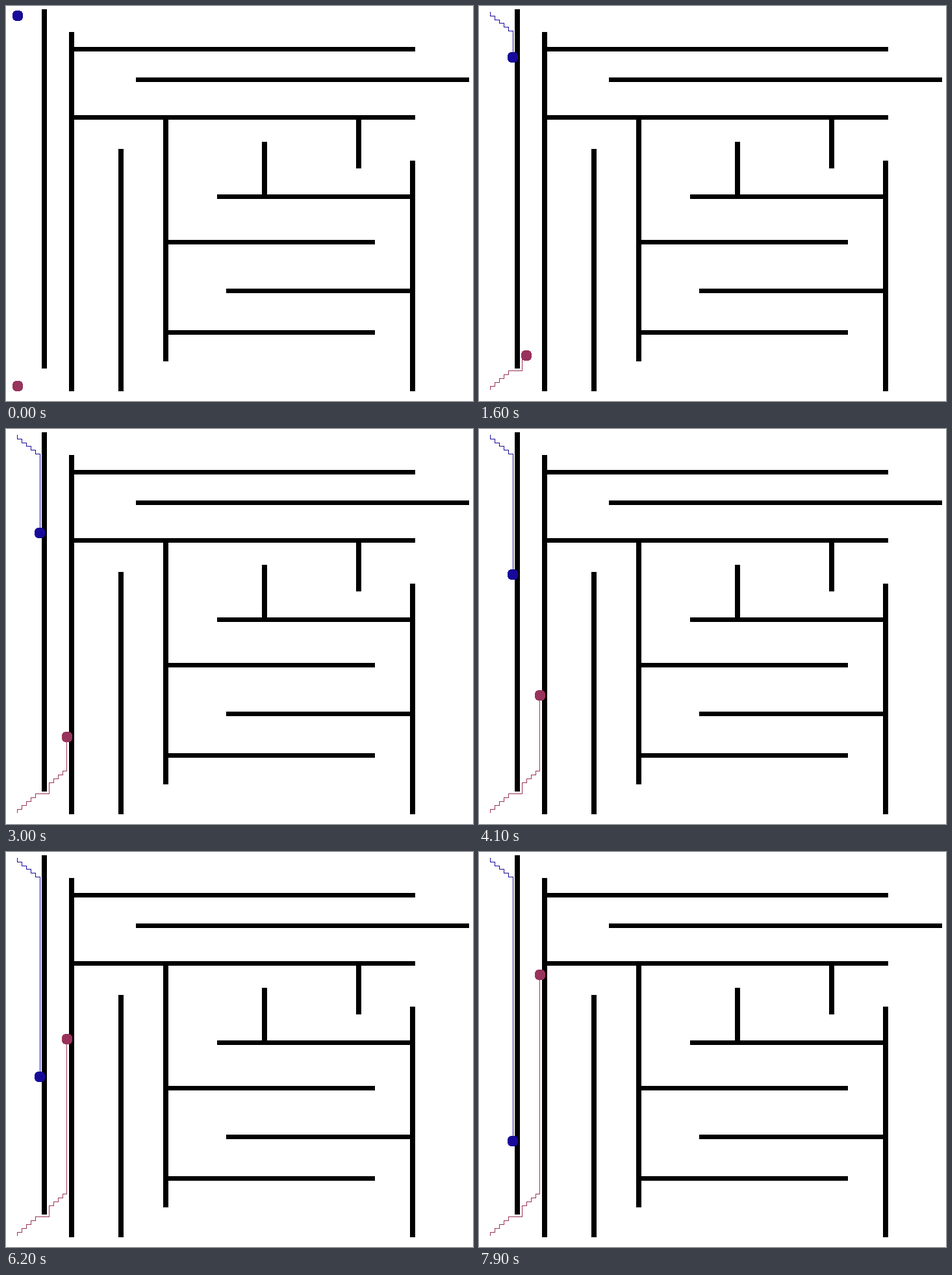
Recreate the animation shown at these times as a matplotlib script. Size 719 px wide and 608 px high, loop 8000 ms.

```python
import numpy as np
import matplotlib.pyplot as plt
from matplotlib.animation import FuncAnimation
from matplotlib.patches import Circle, Rectangle

W, H, DPI = 719, 608, 64
FRAMES, INTERVAL = 80, 100
LAST = 100                        # the maze is a grid of cells 0..LAST
CELL = np.array([6.91, 5.813])
ORIGIN = np.array([17.9, 9.06])
MOVES = {"R": (1, 0), "U": (0, -1), "D": (0, 1)}

fig = plt.figure(figsize=(W / DPI, H / DPI), dpi=DPI, facecolor="white")
ax = fig.add_axes([0, 0, 1, 1])
ax.set_xlim(0, W)
ax.set_ylim(H, 0)
ax.axis("off")


def place(cells):
    """Grid cells to stage pixels."""
    return ORIGIN + np.asarray(cells) * CELL


def wall(start, end):
    """Solid bar covering every cell from start to end."""
    x0, y0 = np.round(place(start)) - 4
    x1, y1 = np.round(place(end)) + (4, 3)
    ax.add_patch(Rectangle((x0, y0), x1 - x0, y1 - y0, fc="black", lw=0,
                           antialiased=False))


def across(row, left, right):
    wall((left, row), (right, row))


def down(col, top, bottom):
    wall((col, top), (col, bottom))


def build_maze():
    outer, inner, right = 12, 33, 88
    roof, shelf = 28, 49
    down(6, 0, LAST - 6)
    down(outer, 6, LAST)
    down(23, 37, LAST)
    down(inner, roof, LAST - 8)
    down(right, 40, LAST)
    down(55, 35, shelf)
    down(76, roof, 41)
    for row in (10, roof):
        across(row, outer, right)
    across(18, 27, LAST)
    for row, left in ((shelf, 45), (74, 47)):
        across(row, left, right)
    for row in (61, 85):
        across(row, inner, 79)


class Walker:
    def __init__(self, start, moves, color):
        steps = [start] + [MOVES[m] for m in moves]
        path = place(np.cumsum(steps, axis=0))
        self.dots = np.round(path)
        self.trail = np.column_stack([np.floor(path[:, 0]), self.dots[:, 1]])
        self.line, = ax.plot([], [], color=color, lw=72 / DPI, snap=True,
                             antialiased=False, solid_capstyle="butt",
                             solid_joinstyle="miter", zorder=3)
        self.dot = ax.add_patch(Circle((0, 0), 8, fc=color, lw=0, zorder=4,
                                       antialiased=False))

    def show(self, step):
        self.line.set_data(*self.trail[:step + 1].T)
        self.dot.center = tuple(self.dots[step])
        return self.line, self.dot


build_maze()

# Each walker climbs stairs to a wall, then follows it.
walkers = [
    Walker((0, 0), "DR" * 5 + "D" * FRAMES, "#170a9a"),
    Walker((0, LAST), "UR" * 4 + "U" + "RRR" + "UU" + "UR" * 4 + "U" * FRAMES,
           "#98335c"),
]


def update(i):
    # The first move is already made when the loop begins.
    return [artist for w in walkers for artist in w.show(i + 1)]


anim = FuncAnimation(fig, update, frames=FRAMES, interval=INTERVAL,
                     repeat=True, repeat_delay=0, blit=False)
plt.show()
```
